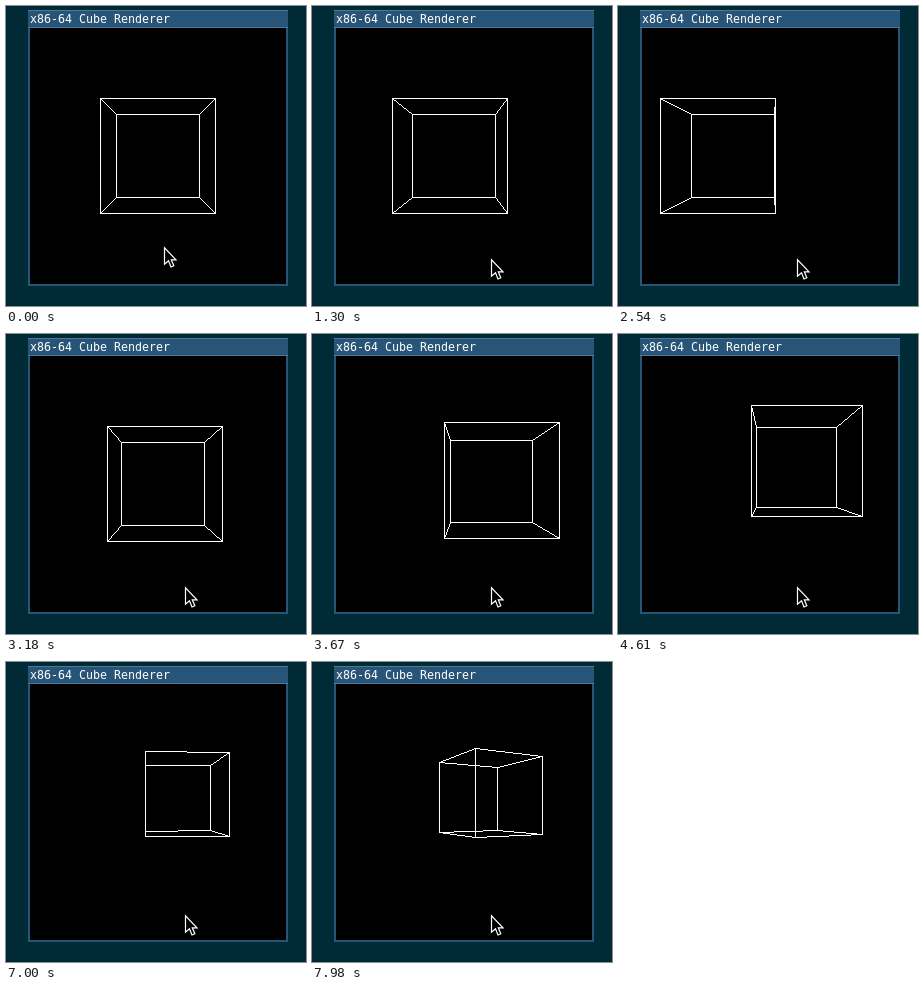
Animation of 300 by 300 pixels, one loop 8000 ms. Source, as an HTML page with a canvas:

```html
<!DOCTYPE html>
<html lang="en">
<head>
<meta charset="utf-8">
<title>Cube Renderer</title>
<style>
  html, body { margin: 0; width: 100%; height: 100%; overflow: hidden; background: #002b36; }
  canvas { display: block; }
</style>
</head>
<body>
<canvas id="stage" width="300" height="300"></canvas>
<script>
const ctx = document.getElementById('stage').getContext('2d');
const LOOP = 8000;
const FOCAL = 288, CENTER_X = 152, CENTER_Y = 150;
const MOVE = 0.06, ZOOM = 0.18, TURN = 0.05;

// Corner index bits give the signs of x, y and z; edges join corners one bit apart.
const corners = Array.from({ length: 8 }, (_, i) => [1, 2, 4].map(bit => (i & bit ? 1 : -1)));
const edges = corners.flatMap((_, i) => [1, 2, 4].filter(bit => !(i & bit)).map(bit => [i, i | bit]));

function rect(color, x, y, w, h) {
  ctx.fillStyle = color;
  ctx.fillRect(x, y, w, h);
}

// Number of key presses so far: one at `start`, then one every 40 ms up to `total`.
function presses(t, start, total = 1) {
  return Math.max(0, Math.min(total, Math.floor((t - start) / 40) + 1));
}

function cubePose(t) {
  const left = presses(t, 570) + presses(t, 1220, 16);
  const right = presses(t, 1890) + presses(t, 2540, 21) + presses(t, 2860) + presses(t, 3380, 5);
  const up = presses(t, 3670) + presses(t, 4330, 6);
  const away = presses(t, 4610) + presses(t, 5270, 9);
  const turns = presses(t, 7000) + presses(t, 7660, 9);
  return { x: (right - left) * MOVE, y: -up * MOVE, z: 6 + away * ZOOM, angle: turns * TURN };
}

function project([x, y, z], pose) {
  const cos = Math.cos(pose.angle), sin = Math.sin(pose.angle);
  const scale = FOCAL / (pose.z + x * sin + z * cos);
  return [
    Math.floor(CENTER_X + scale * (pose.x + x * cos - z * sin)),
    Math.floor(CENTER_Y + scale * (pose.y + y)),
  ];
}

// Hard-edged line, one pixel wide
function pixelLine([x0, y0], [x1, y1]) {
  const dx = x1 - x0, dy = y1 - y0;
  const n = Math.max(Math.abs(dx), Math.abs(dy), 1);
  for (let i = 0; i <= n; i++) {
    ctx.fillRect(Math.round(x0 + dx * i / n), Math.round(y0 + dy * i / n), 1, 1);
  }
}

function drawWindow() {
  rect('#002b36', 0, 0, 300, 300);
  rect('#285577', 22, 4, 260, 276);
  rect('#4c7899', 22, 4, 260, 1);
  rect('#4c7899', 22, 21, 260, 1);
  rect('#000', 24, 22, 256, 256);
  ctx.fillStyle = '#fff';
  ctx.font = '11.63px "DejaVu Sans Mono", monospace';
  ctx.fillText('x86-64 Cube Renderer', 24, 17);
}

function drawCube(t) {
  const pose = cubePose(t);
  const points = corners.map(corner => project(corner, pose));
  ctx.fillStyle = '#fff';
  for (const [a, b] of edges) pixelLine(points[a], points[b]);
}

function drawPointer(t) {
  const glide = presses(t, 40, 5) / 5;
  const settle = presses(t, 1070, 2);
  const x = 158 + Math.round(22 * glide) - (settle === 2 ? 1 : 0);
  const y = 241 + Math.round(10 * glide) + settle;
  ctx.save();
  ctx.translate(x + 0.5, y + 0.8);
  ctx.fillStyle = '#000';
  ctx.strokeStyle = '#fff';
  ctx.lineWidth = 1.2;
  const arrow = new Path2D('M0 0V16.5L4 13L6.5 19.2L9.3 18L6.8 12H11.5Z');
  ctx.fill(arrow);
  ctx.stroke(arrow);
  ctx.restore();
}

function frame() {
  const t = performance.now() % LOOP;
  drawWindow();
  drawCube(t);
  drawPointer(t);
  requestAnimationFrame(frame);
}
frame();
</script>
</body>
</html>
```
